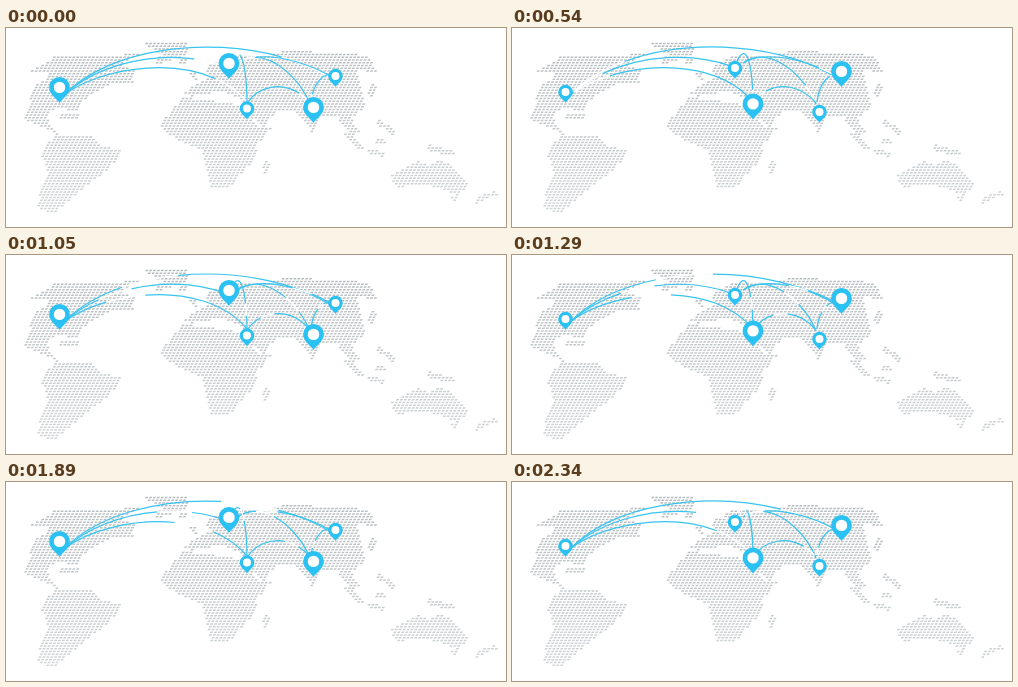
Recreate the animation shown at these times as an HTML page. Size 500x199 px, loop 2.37 s.

```html
<!DOCTYPE html>
<html lang="en">
<head>
<meta charset="utf-8">
<style>
  html, body { margin: 0; width: 100%; height: 100%; overflow: hidden; background: #fff; }
  svg { display: block; width: 500px; height: 199px; }
  #arcs { fill: none; }
  #arcs .line { stroke: #38c4f1; stroke-width: 1.2; stroke-dasharray: 80 20; }
  #arcs .gap { stroke: #fff; stroke-width: 1.4; stroke-dasharray: 20 80; }
</style>
</head>
<body>
<svg viewBox="0 0 500 199">
  <defs>
    <linearGradient id="shade" gradientUnits="userSpaceOnUse" x1="0" y1="15" x2="0" y2="190">
      <stop offset="0" stop-color="#b4babd"/>
      <stop offset="1" stop-color="#d0d4d6"/>
    </linearGradient>
    <g id="pin">
      <path fill="#2bc1f2" d="M0 0C-2 -4 -10.4 -8.5 -10.4 -15.6A10.4 10.4 0 0 1 10.4 -15.6C10.4 -8.5 2 -4 0 0Z"/>
      <circle cy="-15.6" r="5.7" fill="#fff"/>
    </g>
  </defs>
  <path id="map" fill="url(#shade)"/>
  <g id="arcs"></g>
  <g id="pins"></g>
</svg>
<script>
const LOOP = 2370, FLOW = 2400, STEP = 30, TOGGLE = 400;

const land = {
  northAmerica: `M50 28 100 28 137 25 114 37 129 42 127 54 108 55 82 68 70 83 48 80
    42 91 49 104 17 91 30 57 46 46 26 43Z`,
  greenland: 'M136 15 184 14 178 28 147 38 156 26Z',
  southAmerica: 'M48 106 86 108 92 116 115 123 104 141 76 161 47 187 30 179 41 145 36 126Z',
  eurasia: `M199 39 221 27 262 28 284 21 316 25 362 27 371 46 350 40 359 80 345 90
    353 104 347 110 331 88 316 88 306 104 289 84 271 83 256 100 236 72 216 63
    186 68 175 66 204 48Z`,
  africa: 'M177 69 241 78 252 99 265 100 250 118 250 129 222 161 205 160 197 122 168 110 154 97Z',
  australia: 'M384 148 412 132 422 138 436 131 464 155 452 168 424 157 390 159Z'
};

const get = id => document.getElementById(id);

function add(parent, tag, attrs) {
  const el = document.createElementNS('http://www.w3.org/2000/svg', tag);
  for (const key in attrs) el.setAttribute(key, attrs[key]);
  return parent.appendChild(el);
}

// Islands are thick strokes from end to end
const islands = `M185 44 190 52M172 34 181 34M53 89 73 89M262 134 258 147
  M369 112 379 112M338 105 358 121M363 67 369 57M371 92 388 105M362 124 378 126
  M420 119 450 126M448 168 448 173M470 173 491 164`;

function dottedMap() {
  const ctx = document.createElement('canvas').getContext('2d');
  const shapes = Object.values(land).map(d => new Path2D(d));
  const isles = new Path2D(islands);
  ctx.lineWidth = 5.5;
  const dx = 3.9, dy = 2.75;
  let d = '';
  for (let row = 0; row < 64; row++) {
    const y = 15.5 + row * dy;
    for (let x = 12 - (row * 1.3) % dx; x < 496; x += dx) {
      if (shapes.some(s => ctx.isPointInPath(s, x, y)) || ctx.isPointInStroke(isles, x, y))
        d += `M${(x - 1).toFixed(1)} ${(y - 0.75).toFixed(2)}h2.6l-.7 1.5h-2.6z`;
    }
  }
  return d;
}

// Start of each flow comes first
const routes = [
  'M58 67C115 8 255 4 328 52',
  'M58 67C95 33 165 18 222 39',
  'M58 67C100 35 200 24 241 74',
  'M327 50C305 35 255 20 231 35',
  'M304 76C293 48 258 16 231 35',
  'M241 76C241 45 236 10 225 33',
  'M242 74C255 55 285 52 304 75',
  'M326 46C314 46 306 60 305 74'
];

get('map').setAttribute('d', dottedMap());
const arcs = routes.map(d => ['gap', 'line'].map(name =>
  add(get('arcs'), 'path', { d, class: name, pathLength: 100 })));

// x, y of the tip, and whether it is large in the first phase
const places = [
  [53.5, 75, true], [223, 51, true], [307.5, 95, true],
  [241, 91.5, false], [329.5, 59, false]
];
const pins = places.map(() => add(get('pins'), 'use', { href: '#pin' }));

function draw() {
  const t = Math.floor(performance.now() % LOOP / STEP) * STEP;
  const head = t / FLOW * 100;
  for (const [gap, line] of arcs) {
    gap.style.strokeDashoffset = 20 - head;
    line.style.strokeDashoffset = -head;
  }
  const firstPhase = Math.floor(t / TOGGLE) % 2 === 0;
  places.forEach(([x, y, large], i) => {
    const scale = large === firstPhase ? 1 : 0.7;
    pins[i].setAttribute('transform', `translate(${x} ${y}) scale(${scale})`);
  });
  requestAnimationFrame(draw);
}
draw();
</script>
</body>
</html>
```
